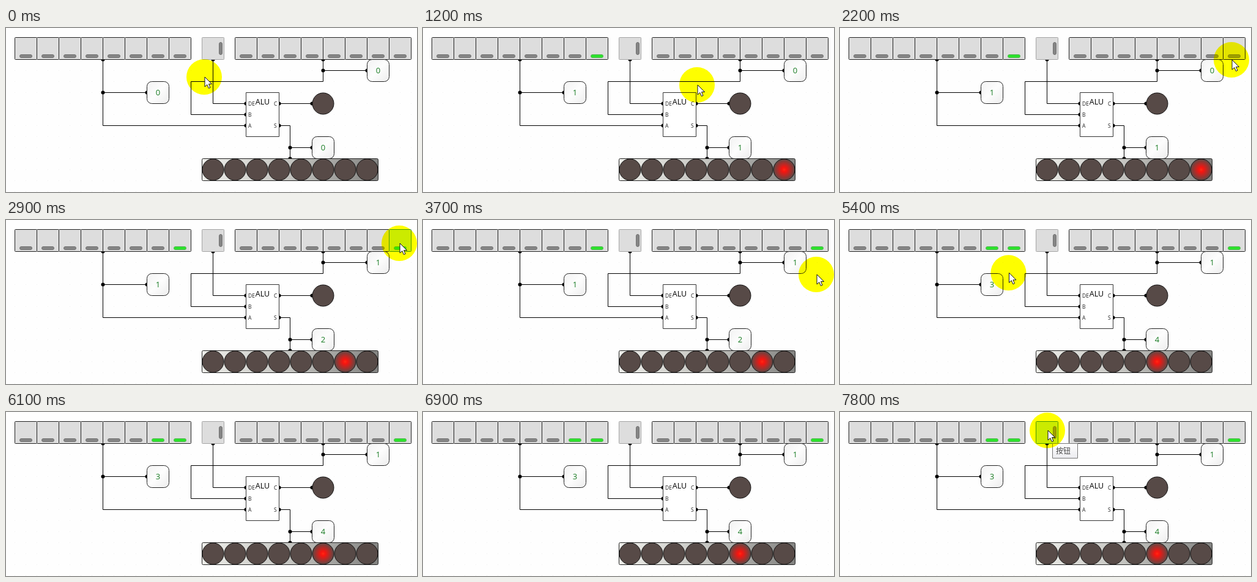
Recreate the animation shown at these times as an HTML page with a canvas. Size 672x268 px, loop 8000 ms.

```html
<!DOCTYPE html>
<html lang="zh">
<head>
<meta charset="utf-8">
<style>
  html, body { margin: 0; height: 100%; overflow: hidden; background: #fefefe; }
  canvas { display: block; }
</style>
</head>
<body>
<canvas id="stage" width="672" height="268"></canvas>
<script>
const ctx = document.getElementById('stage').getContext('2d');
const LOOP = 8000, STEP = 100, CELL = 18, TILE = 2 * CELL;
const UI = '"Open Sans", "Noto Sans", sans-serif';
const CJK = '"Noto Sans CJK SC", "Noto Sans CJK", sans-serif';
const INK = '#222', HOVER = '#bee6fd', HOVER_EDGE = '#3c7fb1', LAMP = '#574a47';

// Every part sits on a grid of columns and rows
const X = col => 14.5 + CELL * col;
const Y = row => 15.5 + CELL * row;

// Where the pointer rests, from one time to another
const stops = [
  { from: 0, to: 0, x: 325, y: 80 },
  { from: 400, to: 800, x: 285, y: 38 },
  { from: 1200, to: 1300, x: 449, y: 93 },
  { from: 2200, to: 2200, x: 641, y: 52 },
  { from: 2500, to: 3100, x: 644, y: 38 },
  { from: 3600, to: 3800, x: 644, y: 89 },
  { from: 4500, to: 5200, x: 262, y: 31 },
  { from: 5900, to: 6900, x: 335, y: 310 },
  { from: 7500, to: LOOP, x: 340, y: 30 }
];

const clamp = v => Math.max(0, Math.min(1, v));

function pointerAt(t) {
  const next = stops.findIndex(s => t <= s.to), b = stops[next], a = stops[next - 1] || b;
  const u = t >= b.from ? 1 : clamp((t - a.to) / (b.from - a.to));
  const ease = u * u * (3 - 2 * u);
  return { x: a.x + (b.x - a.x) * ease, y: a.y + (b.y - a.y) * ease };
}

function paint(fill, stroke) {
  if (fill) { ctx.fillStyle = fill; ctx.fill(); }
  if (stroke) { ctx.strokeStyle = stroke; ctx.stroke(); }
}

function box(x, y, w, h, r, fill, stroke) {
  ctx.beginPath();
  ctx.roundRect(x, y, w, h, r);
  paint(fill, stroke);
}

function disc(x, y, r, fill, stroke) {
  ctx.beginPath();
  ctx.arc(x, y, r, 0, 7);
  paint(fill, stroke);
}

function text(s, x, y, size, color, align = 'left', font = UI) {
  ctx.font = `${size}px ${font}`;
  ctx.textAlign = align;
  ctx.fillStyle = color;
  ctx.fillText(s, x, y);
}

function ramp(x0, y0, x1, y1, ...colors) {
  const g = ctx.createLinearGradient(x0, y0, x1, y1);
  colors.forEach((c, i) => g.addColorStop(i / (colors.length - 1), c));
  return g;
}

// A line through grid points with a dot at both ends
function wire(...points) {
  ctx.beginPath();
  points.forEach(([col, row]) => ctx.lineTo(X(col), Y(row)));
  paint(null, '#000');
  for (const [col, row] of [points[0], points.at(-1)]) disc(X(col), Y(row), 3, '#000');
}

function wiring() {
  wire([8, 2], [8, 8], [21, 8]);
  wire([8, 5], [12, 5]);
  wire([18, 2], [18, 6], [21, 6]);
  wire([28, 2], [28, 4], [16, 4], [16, 7], [21, 7]);
  wire([28, 3], [32, 3]);
  wire([24, 6], [27, 6]);
  wire([24, 8], [25, 8], [25, 11]);
  wire([25, 10], [27, 10]);
}

function dots() {
  ctx.fillStyle = '#efefef';
  for (let col = 0; col < 37; col++)
    for (let row = 0; row < 15; row++) ctx.fillRect(X(col) - .5, Y(row) - .5, 1, 1);
}

// One square key; returns its left edge
function key(col, mouse, edge) {
  const x = X(col), y = Y(0);
  const hot = mouse.x > x && mouse.x < x + TILE && mouse.y > y && mouse.y < y + TILE;
  box(x, y, TILE, TILE, 1, hot ? HOVER : '#ddd', hot ? HOVER_EDGE : edge);
  return x;
}

function led(x, y, w, h, on) {
  box(x, y, w, h, 2.5, on ? '#2be32b' : '#858585', on ? '#56b556' : '#737373');
}

function switches(col, value, mouse) {
  for (let i = 0; i < 8; i++)
    led(key(col + 2 * i, mouse, INK) + 8, 43.5, 20, 5, value >> (7 - i) & 1);
}

function readout(col, row, value) {
  const x = X(col), y = Y(row);
  box(x, y, TILE, TILE, 8, ramp(x, y, x + TILE, y + TILE, '#f2f2f2', '#fdfdfd', '#ececec'), INK);
  text(value, x + CELL, y + 22.5, 13, '#187a22', 'center');
}

function lamp(col, row, on) {
  const x = X(col), y = Y(row);
  let fill = LAMP;
  if (on) {
    fill = ctx.createRadialGradient(x, y, 0, x, y, CELL);
    fill.addColorStop(0, '#ff2a14');
    fill.addColorStop(.2, '#f8140f');
    fill.addColorStop(1, LAMP);
  }
  disc(x, y, 17.5, fill, '#111');
}

function lamps(col, row, value) {
  const x = X(col), y = Y(row), w = 8 * TILE;
  box(x, y, w, TILE, 2, ramp(x, y, x + w, y + TILE, '#eeeeea', '#c4c4c0', '#828280'), INK);
  for (let i = 0; i < 8; i++) lamp(col + 1 + 2 * i, row + 1, value >> (7 - i) & 1);
}

function alu() {
  box(X(21), Y(5), 3 * CELL, 4 * CELL, 0, '#fff', '#333');
  ['DE', 'B', 'A'].forEach((s, i) => text(s, X(21) + 3.5, Y(6 + i) + 3, 8.5, INK));
  ['C', 'S'].forEach((s, i) => text(s, X(24) - 8.5, Y(6 + 2 * i) + 3, 8.5, INK));
  text('ALU', X(22.5), Y(6) + 1, 12.5, '#000', 'center');
}

function tooltip(label, x, y, w, alpha) {
  const h = 24;
  ctx.globalAlpha = alpha;
  box(x + .5, y + .5, w, h, 0, ramp(0, y, 0, y + h, '#fff', '#ececf0'), '#777');
  text(label, x + 6, y + 16.5, 12, '#484848', 'left', CJK);
  ctx.globalAlpha = 1;
}

function pointer({ x, y }) {
  ctx.globalCompositeOperation = 'multiply';
  disc(x - 1, y, 29, '#ff0');
  ctx.globalCompositeOperation = 'overlay';
  disc(x - 1, y, 29, 'rgba(255, 255, 0, .2)');
  ctx.globalCompositeOperation = 'source-over';
  ctx.stroke(new Path2D());
  const arrow = new Path2D(`M${x} ${y}v16l3.8-3.4 2.6 5.9 2.6-1.1-2.5-5.8h5z`);
  ctx.fillStyle = '#fff';
  ctx.fill(arrow);
  ctx.strokeStyle = '#111';
  ctx.stroke(arrow);
}

function draw(t) {
  const a = t < 600 ? 0 : t < 5000 ? 1 : 3;
  const b = t < 2800 ? 0 : 1;
  const mouse = pointerAt(t);

  ctx.fillStyle = '#fefefe';
  ctx.fillRect(0, 0, 672, 268);
  dots();
  wiring();
  switches(0, a, mouse);
  led(key(17, mouse, '#a4a4a4') + 28, 23.5, 5, 20, false);
  switches(20, b, mouse);
  alu();
  readout(12, 4, a);
  readout(32, 2, b);
  readout(27, 9, a + b);
  lamp(28, 6, false);
  lamps(17, 11, a + b);

  tooltip('8位输入', 300, 46, 56, Math.min(clamp((t - 4400) / 200), clamp((5100 - t) / 100)));
  tooltip('按钮', 347, 51, 41, clamp((t - 7500) / 200));
  pointer(mouse);
}

function tick(now) {
  draw(Math.floor(now % LOOP / STEP) * STEP);
  requestAnimationFrame(tick);
}
requestAnimationFrame(tick);
</script>
</body>
</html>
```
